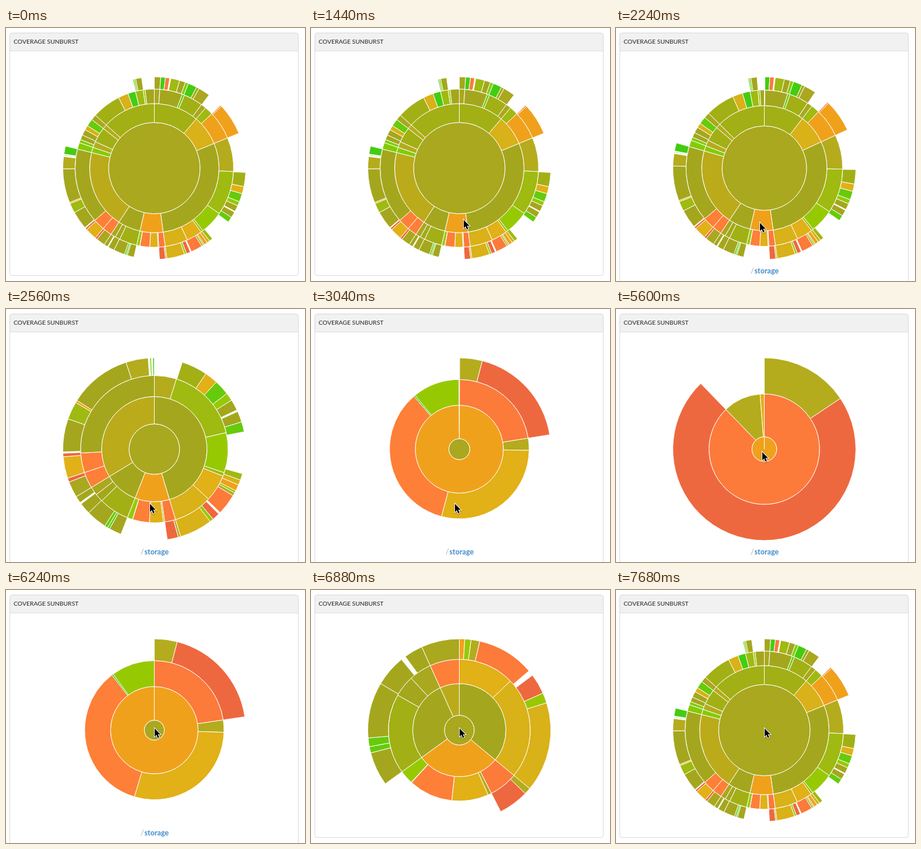
Animation, 513 px wide and 435 px high, one loop 8000 ms. Source, as an HTML page with a canvas:

```html
<!DOCTYPE html>
<html lang="en">
<head>
<meta charset="utf-8">
<title>Coverage sunburst</title>
<style>
  html, body { margin: 0; width: 100%; height: 100%; overflow: hidden; background: #fff; }
  canvas { display: block; }
</style>
</head>
<body>
<canvas id="stage" width="513" height="435"></canvas>
<script>
const ctx = document.getElementById('stage').getContext('2d');
const LOOP = 8000, TICK = 160, ZOOM_MS = 1000;
const CX = 254.5, CY = 241, RADIUS = 157, HUB = 18;

// Coverage colours from worst to best.
const red = '#ee683f', coral = '#fc7a3a', orange = '#fe7f37', amber = '#f0a11c', gold = '#e2b017',
  yellow = '#d9b118', ochre = '#bbab1b', mustard = '#b4ac1d', khaki = '#a9a81e', olive = '#a4a71d',
  moss = '#a2b015', leaf = '#9fba10', lime = '#97c903', grass = '#84cb04', neon = '#66cb0a',
  bright = '#44cc11', gap = null;

// Each arc: end angle in degrees and colour; it starts where the one before ends.
const groups = [
  [40.3, moss], [67.5, yellow], [172.1, olive], [192.9, amber], [213.2, olive], [284, ochre],
  [288.8, grass], [294.2, mustard], [307.9, moss], [312, mustard], [360, moss]
];
const folders = [
  [4, khaki], [20.7, olive], [22.4, neon], [36.5, moss], [40.3, khaki], [46.5, leaf], [67.5, amber],
  [92.5, mustard], [125, leaf], [142.3, lime], [143.8, leaf], [155.4, gold], [172.1, yellow],
  [176.767, coral], [177.352, mustard], [183.358, gold], [190.56, orange], [190.633, bright], [192.9, lime],
  [206, moss], [209.5, olive], [213.2, khaki], [220.2, orange], [228.7, orange], [284, olive],
  [288.8, grass], [291.2, grass], [294.8, olive], [299.1, olive], [302.5, yellow], [307.9, neon],
  [312, khaki], [333.2, moss], [340.6, yellow], [346.2, bright], [351.9, leaf], [353.3, lime], [360, olive]
];
const files = [
  [4, olive], [7, bright], [9.7, coral], [10.4, gap], [16.1, leaf], [19.9, olive], [21.9, grass],
  [27.5, bright], [29.3, khaki], [36.7, khaki], [46.5, gap], [47.3, coral], [67.5, amber], [92.7, gap],
  [101.7, moss], [106.3, gold], [111.6, neon], [114.4, lime], [118.2, olive], [118.8, gap],
  [122.6, olive], [126.1, neon], [140.6, gap], [142.9, leaf], [144.7, yellow], [146.9, amber],
  [147.7, lime], [148.8, mustard], [156.1, coral], [156.8, gap], [159.4, red], [160.7, lime],
  [172.1, yellow], [172.931, mustard], [176.767, red], [192.9, gap], [197.2, olive], [198, neon],
  [199.1, neon], [206.2, olive], [210.2, olive], [210.8, gap], [213.2, olive], [218.8, khaki],
  [220.2, red], [227.7, gold], [228.9, red], [229.4, gap], [240.9, olive], [247.1, leaf],
  [247.9, amber], [269.6, olive], [277.3, mustard], [277.9, gap], [278.4, neon], [278.9, gap],
  [284, bright], [346.4, gap], [347.2, bright], [348.2, grass], [352, olive]
];
const rings = [[[360, khaki]], groups, folders, files];

// View: first angle, last angle, inner depth, hub radius.
const root = [0, 360, 0, 0];
const storage = [172.1, 192.9, 0.25, HUB];
const rethink = [172.1, 176.767, 0.5, HUB];
const zooms = [
  { at: 2066, view: storage, path: ['storage'] },
  { at: 3853, view: rethink, path: ['storage', 'rethinkdb'] },
  { at: 5384, view: storage, path: ['storage'] },
  { at: 6545, view: root, path: [] }
];

// Pointer moves: start time, end time, x, y.
const moves = [
  [640, 960, 262, 330], [1440, 1760, 247, 335], [3200, 3680, 316, 176],
  [4480, 5120, 251, 246], [5600, 5760, 255, 238]
];

const clamp = (v, lo, hi) => Math.max(lo, Math.min(hi, v));
const lerp = (a, b, k) => a + (b - a) * k;
const cubic = k => k < 0.5 ? 4 * k ** 3 : 1 - 4 * (1 - k) ** 3;
const smooth = k => k * k * (3 - 2 * k);

function label(text, x, y, fill, font) {
  ctx.font = font + ' Lato, sans-serif';
  ctx.fillStyle = fill;
  ctx.fillText(text, x, y);
}

function drawPanel(open) {
  ctx.beginPath();
  ctx.roundRect(6.5, 8.5, 495, open ? 450 : 417, 4);
  ctx.save();
  ctx.clip();
  ctx.fillStyle = '#f1f1f1';
  ctx.fillRect(6, 8, 496, 31);
  ctx.fillStyle = '#ddd';
  ctx.fillRect(6, 39, 496, 1);
  ctx.restore();
  ctx.strokeStyle = '#d8d8d8';
  ctx.lineWidth = 1;
  ctx.stroke();
  label('COVERAGE SUNBURST', 13, 27, '#222', '10.4px');
}

function drawPath(path) {
  let x = path.length > 1 ? 199 : 231;
  path.forEach((name, i) => {
    const weight = i === path.length - 1 ? 'bold ' : '';
    label('/', x, 422, '#aaa', '12.6px');
    label(name, x + 6.5, 422, '#428bca', weight + '12.6px');
    x += 51;
  });
}

function drawSunburst([x0, x1, depth, hub]) {
  const angle = a => clamp((a - x0) / (x1 - x0), 0, 1) * 2 * Math.PI;
  const inner = Math.sqrt(depth);
  const radius = d => Math.max(0, hub + (RADIUS - hub) * (Math.sqrt(d) - inner) / (1 - inner));

  ctx.save();
  ctx.translate(CX, CY);
  ctx.rotate(-Math.PI / 2);
  ctx.strokeStyle = '#fff';
  ctx.lineWidth = 1;
  rings.forEach((ring, level) => {
    const r0 = radius(level / 4), r1 = radius((level + 1) / 4);
    let start = 0;
    for (const [end, fill] of ring) {
      const a = angle(start), b = angle(end);
      start = end;
      if (!fill || r1 === 0) continue;
      ctx.beginPath();
      ctx.arc(0, 0, r1, a, b);
      if (level > 0) ctx.arc(0, 0, r0, b, a, true);
      if (level > 0) ctx.closePath();
      ctx.fillStyle = fill;
      ctx.fill();
      ctx.stroke();
    }
  });
  ctx.restore();
}

const arrow = new Path2D('M0 0V14L3.2 11L5.4 16.2L7.8 15.2L5.6 10.2H10Z');

function drawPointer(t) {
  if (t < moves[0][0]) return;
  let x = 302, y = 425;
  for (const [from, to, toX, toY] of moves) {
    const k = smooth(clamp((t - from) / (to - from), 0, 1));
    x = lerp(x, toX, k);
    y = lerp(y, toY, k);
  }
  ctx.save();
  ctx.translate(x, y);
  ctx.strokeStyle = '#fff';
  ctx.lineWidth = 2;
  ctx.shadowColor = 'rgba(0,0,0,.35)';
  ctx.shadowBlur = 2;
  ctx.shadowOffsetY = 1;
  ctx.stroke(arrow);
  ctx.shadowColor = 'transparent';
  ctx.fillStyle = '#000';
  ctx.fill(arrow);
  ctx.restore();
}

function draw(now) {
  const t = Math.floor((now % LOOP) / TICK) * TICK;
  let view = root, path = [];
  for (const zoom of zooms) {
    if (t < zoom.at) break;
    const k = cubic(clamp((t - zoom.at) / ZOOM_MS, 0, 1));
    view = view.map((v, i) => lerp(v, zoom.view[i], k));
    path = zoom.path;
  }
  ctx.fillStyle = '#fff';
  ctx.fillRect(0, 0, 513, 435);
  drawPanel(path.length > 0);
  drawSunburst(view);
  drawPath(path);
  drawPointer(t);
}

const begin = performance.now();
function frame() {
  draw(performance.now() - begin);
  requestAnimationFrame(frame);
}
frame();
</script>
</body>
</html>
```
